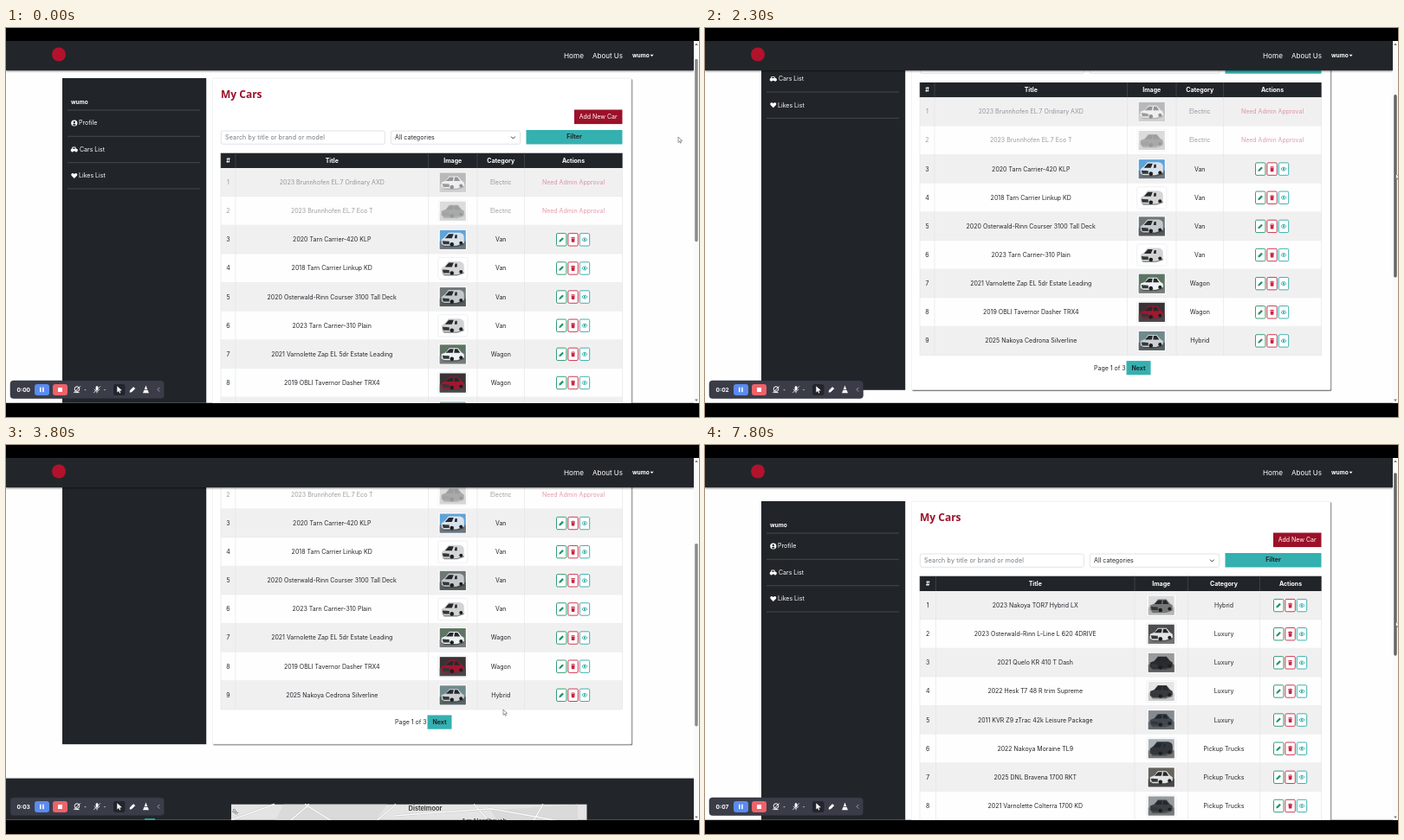
These frames come from a looping animation (800 px wide and 450 px high, 8000 ms). An HTML page:

```html
<!DOCTYPE html>
<html lang="en">
<head>
<meta charset="utf-8">
<title>My Cars</title>
<style>
html, body { margin: 0; width: 100%; height: 100%; overflow: hidden; background: #000; }
svg { display: block; width: 100vw; height: 100vh; }
text { font-family: Inter, "Open Sans", sans-serif; white-space: pre; }
</style>
</head>
<body>
<svg id="stage" viewBox="0 0 800 450"></svg>
<script>
const LOOP = 8000, STEP = 100;
const NEXT_PAGE = 5200, ICONS_READY = 6700, TOOLS_BACK = 7000;
const DARK = '#212529', RED = '#9b1128', TEAL = '#35b0b0', LINE = '#dee2e6';
const GREEN = '#1f9565', ROSE = '#cc2340', AQUA = '#2ba7a7';

// Each car: title, category, photo backdrop, ground, body, shape
const PAGES = [
  [
    ['2023 Brunnhofen EL.7 Ordinary AXD', 'Electric', '#777', '#aaa', '#eee', 'car'],
    ['2023 Brunnhofen EL.7 Eco T', 'Electric', '#b5b5b5', '#a5a5a5', '#444', 'car'],
    ['2020 Tarn Carrier-420 KLP', 'Van', '#5fa3d8', '#70757a', '#d9e2ea', 'van'],
    ['2018 Tarn Carrier Linkup KD', 'Van', '#fff', '#fff', '#d6d6d6', 'van'],
    ['2020 Osterwald-Rinn Courser 3100 Tall Deck', 'Van', '#6f7775', '#565b5c', '#c3c8ca', 'van'],
    ['2023 Tarn Carrier-310 Plain', 'Van', '#fff', '#fff', '#d2d2d2', 'van'],
    ['2021 Varnolette Zap EL 5dr Estate Leading', 'Wagon', '#5d7562', '#777d7c', '#edf1f2', 'car'],
    ['2019 OBLI Tavernor Dasher TRX4', 'Wagon', '#3a3335', '#4b474a', '#a01730', 'car'],
    ['2025 Nakoya Cedrona Silverline', 'Hybrid', '#718a8c', '#586164', '#cbd1d2', 'car']
  ],
  [
    ['2023 Nakoya TOR7 Hybrid LX', 'Hybrid', '#dadada', '#b5b5b5', '#777', 'car'],
    ['2023 Osterwald-Rinn L-Line L 620 4DRIVE', 'Luxury', '#4b4d4e', '#747474', '#e4e4e4', 'car'],
    ['2021 Quelo KR 410 T Dash', 'Luxury', '#9b9b9b', '#606060', '#292b2d', 'car'],
    ['2022 Hesk T7 48 R trim Supreme', 'Luxury', '#e6e6e6', '#c9c9c9', '#383a3d', 'car'],
    ['2011 KVR Z9 zTrac 42k Leisure Package', 'Luxury', '#858b90', '#65696d', '#40474f', 'car'],
    ['2022 Nakoya Moraine TL9', 'Pickup Trucks', '#a9b2b8', '#777', '#33373b', 'van'],
    ['2025 DNL Bravena 1700 RKT', 'Pickup Trucks', '#66625e', '#484848', '#e3e3e3', 'car'],
    ['2021 Varnolette Colterra 1700 KD', 'Pickup Trucks', '#969ba0', '#77797b', '#3b3e42', 'car'],
    ['2020 Tarn Ridgeback KLP', 'Pickup Trucks', '#d5d5d5', '#999', '#444', 'car']
  ]
];
const COLS = {
  first: [248, 265, 487.5, 544, 598.5, 711.5],
  bare: [248, 267, 507, 572, 657.5, 711.5],
  full: [248, 266.5, 496, 557.5, 640.5, 711.5]
};

const SCROLL = [[0, 27], [900, 27], [1200, 36], [1400, 36], [1600, 50], [2000, 84], [2100, 84],
  [2300, 108.7], [2700, 156.6], [3000, 178], [3200, 181.3], [NEXT_PAGE - STEP, 181.3],
  [NEXT_PAGE, 0], [7600, 0], [7800, 20]];
const POINTER = [[0, 776, 126], [700, 797.5, 126], [3400, 797.5, 206], [3800, 574, 306],
  [3900, 574, 306], [4800, 501, 318], [5200, 501, 318], [6000, 747, 224], [6400, 747, 224],
  [6500, 766.5, 221], [7300, 797.5, 194], [7600, 797.5, 194], [7800, 797.5, 204]];

function at(keys, t, i = 1) {
  const n = keys.findIndex(k => k[0] > t);
  if (n < 0) return keys[keys.length - 1][i];
  const a = keys[n - 1], b = keys[n];
  return a[i] + (b[i] - a[i]) * (t - a[0]) / (b[0] - a[0]);
}

const rect = (x, y, w, h, fill, more = '') =>
  `<rect x="${x}" y="${y}" width="${w}" height="${h}" fill="${fill}" ${more}/>`;
const path = (d, fill, more = '') => `<path d="${d}" fill="${fill}" ${more}/>`;
const stroke = (d, color, w = 1, more = '') =>
  path(d, 'none', `stroke="${color}" stroke-width="${w}" ${more}`);
const group = (x, y, body, more = '') => `<g transform="translate(${x} ${y})" ${more}>${body}</g>`;
const dot = (x, y, r, fill) => `<circle cx="${x}" cy="${y}" r="${r}" fill="${fill}"/>`;

// y is the middle of the line
function text(x, y, str, { size = 7, fill = DARK, anchor = 'start', weight = 400, more = '' } = {}) {
  return `<text x="${x}" y="${y + size * .35}" font-size="${size}" fill="${fill}"` +
    ` text-anchor="${anchor}" font-weight="${weight}" ${more}>${str}</text>`;
}
const mid = (x, y, str, o = {}) => text(x, y, str, { ...o, anchor: 'middle' });

const glyphs = {
  pencil: c => path('M-2.9 2.9L-2.4 .8 1.1 -2.7 2.7 -1.1 -.8 2.4Z', c),
  trash: c => path('M-2.4 -2.6H-.8L-.4 -3.1H.4L.8 -2.6H2.4V-1.8H-2.4ZM-2 -1.4H2L1.7 3H-1.7Z', c),
  eye: c => stroke('M-3.1 0Q0 -4 3.1 0Q0 4 -3.1 0Z', c, .9) + dot(0, 0, 1.1, c),
  user: c => dot(0, 0, 3.6, c) + dot(0, -1, 1.2, DARK) + path('M-2.1 2.1Q0 -.5 2.1 2.1Q0 3.3 -2.1 2.1Z', DARK),
  car: c => path('M-4 2.2V0L-3 -.6 -2 -2.8H1.2L2.6 -.6 4 0V2.2Z', c) +
    dot(-2.2, 2, 1.1, c) + dot(2.2, 2, 1.1, c) + path('M-2 -.7L-1.4 -2H.8L1.6 -.7Z', DARK),
  heart: c => path('M0 3.2L-3 .2C-4.8 -2 -1.8 -4.3 0 -1.8C1.8 -4.3 4.8 -2 3 .2Z', c)
};

// Three-quarter view with the front to the left
function photo(x, y, [, , sky, ground, body, shape]) {
  const van = shape === 'van';
  const hull = van ? 'M-13 5V0L-9 -3 -5 -8H8Q13 -7 13 -3V4L4 7H-10Z' : 'M-13 5V0L-8 -2 -4 -7H6L10 -2 13 0V4L5 7H-10Z';
  const glass = van ? 'M-9 -1.5L-4.5 -6.5H1L-1 -1.5ZM2 -1.5L2.8 -5.5H5V-1.5Z' : 'M-8 -1.5L-3.5 -6H1L0 -1.5ZM1.5 -1.5L2.3 -6H5.5L8.5 -1.5Z';
  return group(x, y, rect(-17, -12.5, 34, 25, '#fff', `rx="1.5" stroke="${LINE}" stroke-width=".5"`) +
    rect(-15, -11, 30, 22, sky) + rect(-15, 2, 30, 9, ground) +
    path('M-12 6L5 7 13 4V6L5 8.5H-10Z', '#3a3c3e', 'opacity=".6"') +
    path(hull, body) + path(glass, '#25292d') + path('M-12 1.5L-4 2V5.5H-11Z', '#33373a') +
    dot(-1, 5.5, 2.3, '#1c1e20') + dot(9.5, 4, 2, '#1c1e20'));
}

function actions(x, y, ready) {
  return [['pencil', GREEN], ['trash', ROSE], ['eye', AQUA]].map(([name, c], i) => {
    const [gap, w, h] = ready ? [13.4, 11.4, 14.4] : [7.8, 6, 7];
    const box = rect(-w / 2, -h / 2, w, h, '#fff', `rx="1.4" stroke="${c}" stroke-width=".9"`);
    return group(x - .4 + (i - 1) * gap, y, box + (ready ? glyphs[name](c) : ''));
  }).join('');
}

function table(cars, cols, ready, first) {
  const center = i => (cols[i] + cols[i + 1]) / 2, top = 189, pitch = 33.13;
  let out = rect(248, 171.7, 463.5, top - 171.7, DARK);
  ['#', 'Title', 'Image', 'Category', 'Actions'].forEach((h, i) =>
    out += mid(center(i), 180.2, h, { fill: '#fff', weight: 700 }));
  cars.forEach((car, i) => {
    const y = top + i * pitch, m = y + pitch / 2, waiting = first && i < 2;
    out += rect(248, y, 463.5, pitch, i % 2 ? '#fefefe' : '#f1f0f1');
    out += `<g opacity="${waiting ? .45 : 1}">` + mid(center(0), m, i + 1) +
      mid(center(1), m, car[0]) + photo(center(2), m, car) + mid(center(3), m, car[1]) +
      (waiting ? mid(center(4), m, 'Need Admin Approval', { fill: '#c2254a' }) : actions(center(4), m, ready)) + '</g>';
    out += stroke(`M248 ${y + pitch}H711.5`, LINE, .6);
  });
  cols.forEach(x => out += stroke(`M${x} 171.7V${top}`, '#4d5154', .6) +
    stroke(`M${x} ${top}V${top + 9 * pitch}`, LINE, .6));
  return out;
}

function sidebar(ready) {
  let out = rect(65, 85, 166.2, 442.5, DARK) + text(75, 113, 'wumo', { size: 6.6, fill: '#fff', weight: 700 });
  [['Profile', 'user', 84], ['Cars List', 'car', 85], ['Likes List', 'heart', 84]].forEach(([label, icon, x], i) => {
    const y = 137 + i * 30.4;
    out += text(ready ? x : 75, y, label, { fill: '#fff' }) + (ready ? group(78.8, y, glyphs[icon]('#fff')) : '');
  });
  [122, 152.3, 182.7, 213].forEach(y => out += stroke(`M71 ${y}H224`, '#53575b', .7));
  return out;
}

function footer() {
  const roads = 'M260 615L310 597M300 640L350 597M345 597L390 625 470 640M400 640L450 597' +
    'M450 610L560 602 670 622M540 597L580 640M620 597L595 640';
  return rect(0, 567, 794, 120, DARK, 'filter="url(#soft)"') +
    rect(260, 597, 410.5, 90, '#e4e4e4') +
    path('M320 597H440L410 640H300ZM560 604L660 597V640H580Z', '#d9dad9') +
    stroke(roads, '#c6c6c6', 2.4) + stroke(roads, '#fafafa', 1.5) +
    mid(265, 606, 'Str.', { size: 6, fill: '#555', more: 'transform="rotate(35 265 606)"' }) +
    mid(484, 602, 'Distelmoor', { size: 7.4, fill: '#333', weight: 600 }) +
    mid(552, 617, 'Am Nordbruch', { size: 7.4, fill: '#333', weight: 600 }) +
    rect(160, 613.5, 12, 10, TEAL);
}

function page(cars, cols, ready, number) {
  const field = `rx="2" stroke="#d3d7db" stroke-width=".7"`;
  return sidebar(ready) +
    rect(238.3, 85.2, 483.5, 442, '#fff', `rx="1" stroke="#dfe1e3" stroke-width=".5" filter="url(#drop)"`) +
    text(248, 104, 'My Cars', { size: 12, fill: RED, weight: 600, more: 'style="font-family:\'Noto Sans\',sans-serif"' }) +
    rect(656, 121.5, 55.5, 16.6, RED) + mid(683.7, 129.7, 'Add New Car', { fill: '#fff' }) +
    rect(248.3, 146, 189, 15.3, '#fff', field) +
    text(253, 153.5, 'Search by title or brand or model', { fill: '#70767c', more: 'letter-spacing=".2"' }) +
    rect(444.3, 146, 149.3, 15.3, '#fff', field) + text(449, 153.5, 'All categories', { size: 7.1 }) +
    stroke('M583 152.6L585.4 155 587.8 152.6', '#343a40', 1) +
    rect(600.5, 145, 111, 16.5, TEAL) + mid(656, 153, 'Filter', { weight: 700 }) +
    table(cars, cols, ready, number === 1) +
    text(449, 502, `Page ${number} of 3`) + rect(486.5, 493.8, 28, 16.2, TEAL) +
    mid(500.5, 502, 'Next', { weight: 700 }) + footer();
}

function header() {
  return rect(0, 15, 794, 34, DARK, 'filter="url(#soft)"') + dot(61, 30.5, 8, '#b3122c') +
    text(644, 32, 'Home', { size: 8.2, fill: '#fff' }) + text(677, 32, 'About Us', { size: 8, fill: '#fff' }) +
    text(723, 32, 'wumo', { size: 6.6, fill: '#fff', weight: 700 }) + path('M743.6 30.8H747.6L745.6 33Z', '#fff');
}

function tools() {
  const w = '#fff', caret = x => path(`M${x - 1.3} 418H${x + 1.3}L${x} 419.5Z`, '#aaafb8');
  return rect(5, 408, 177.5, 20.5, '#3a3d48', 'rx="3.5" stroke="#2c2f37" stroke-width=".5"') +
    text(12.5, 418.3, '0:00', { size: 6.6, fill: w, weight: 700, more: 'id="clock"' }) +
    rect(33, 412, 17, 13, '#5a8bf0', 'rx="3"') + rect(39, 415.7, 1.5, 5.5, w) + rect(42.2, 415.7, 1.5, 5.5, w) +
    rect(54, 412, 17, 13, '#ee626a', 'rx="3"') + rect(60, 416, 5, 5, w, 'rx=".6"') +
    group(82, 418.3, `<circle r="2.8" cy="-.7" fill="none" stroke="#fff"/>` + stroke('M-2.5 3.3H2.5M-3.8 3.8L3.8 -3.8', w)) + caret(91.5) +
    group(105, 418.3, rect(-1.4, -4, 2.8, 5, w, 'rx="1.4"') + stroke('M-3 -.5Q0 4.5 3 -.5M0 2V4M-3.8 3.8L3.8 -3.8', w, .8)) + caret(114) +
    rect(124, 412, 13.5, 13, '#22252d', 'rx="2.5"') + path('M128.3 414.3L133.8 419.2 131.2 419.4 132.3 422 131.2 422.5 130.1 419.9 128.3 421.5Z', w) +
    group(146, 418.3, glyphs.pencil(w), 'stroke="#fff" stroke-width=".9"') +
    path('M161.5 413.5L163.2 418H159.8ZM159.5 418.8H163.5L165 422.2H158Z', w) +
    stroke('M177.3 416L175 418.3 177.3 420.6', '#aab', .9);
}

const layer = (id, body) => `<g id="${id}">${body}</g>`;
const $ = id => document.getElementById(id);

$('stage').innerHTML = `<defs>
  <clipPath id="view"><rect x="0" y="15" width="800" height="418.7"/></clipPath>
  <filter id="drop" x="-5%" y="-5%" width="110%" height="110%"><feDropShadow dx="1.1" dy="1.1" stdDeviation=".55" flood-opacity=".65"/></filter>
  <filter id="soft" x="-2%" y="-20%" width="104%" height="150%"><feDropShadow dx="0" dy=".8" stdDeviation="1" flood-opacity=".6"/></filter>
  </defs>` + rect(0, 0, 800, 450, '#000') + `<g clip-path="url(#view)">` + rect(0, 15, 800, 419, '#fefefe') +
  layer('page', layer('first', page(PAGES[0], COLS.first, true, 1)) +
    layer('bare', page(PAGES[1], COLS.bare, false, 2)) + layer('full', page(PAGES[1], COLS.full, true, 2))) +
  header() + rect(794, 15, 6, 419, '#fafafa') +
  path('M795.2 20L797 17.6 798.8 20ZM795.2 429.5L797 432 798.8 429.5Z', '#777') +
  rect(795.2, 22, 3.5, 211.5, '#8b8b8b', 'id="thumb" rx="1.7"') + layer('tools', tools()) +
  layer('pointer', path('M0 0V6.3L1.5 5 2.5 7.2 3.5 6.8 2.5 4.7 4.5 4.5Z', '#fff', 'stroke="#555" stroke-width=".6"')) + '</g>';

const show = (id, on) => $(id).style.display = on ? '' : 'none';
const move = (id, x, y) => $(id).setAttribute('transform', `translate(${x} ${y})`);

const start = performance.now();
function draw(now) {
  const t = Math.floor((Math.max(0, now - start) % LOOP) / STEP) * STEP;
  const y = at(SCROLL, t);
  const dragging = (t >= 1000 && t < 3500) || t >= 7600;
  const px = at(POINTER, t, 1);
  const py = t > 700 && t <= 3400 ? 126 + (y - 27) * .52 : at(POINTER, t, 2);
  show('first', t < NEXT_PAGE);
  show('bare', t >= NEXT_PAGE && t < ICONS_READY);
  show('full', t >= ICONS_READY);
  show('tools', t < NEXT_PAGE || t >= TOOLS_BACK);
  move('page', 0, -y);
  move('pointer', px, py);
  $('thumb').setAttribute('y', 22 + y * .507);
  $('thumb').setAttribute('fill', dragging ? '#666' : '#8b8b8b');
  $('clock').textContent = '0:0' + Math.floor(t / 1000);
  requestAnimationFrame(draw);
}
draw(start);
</script>
</body>
</html>
```
